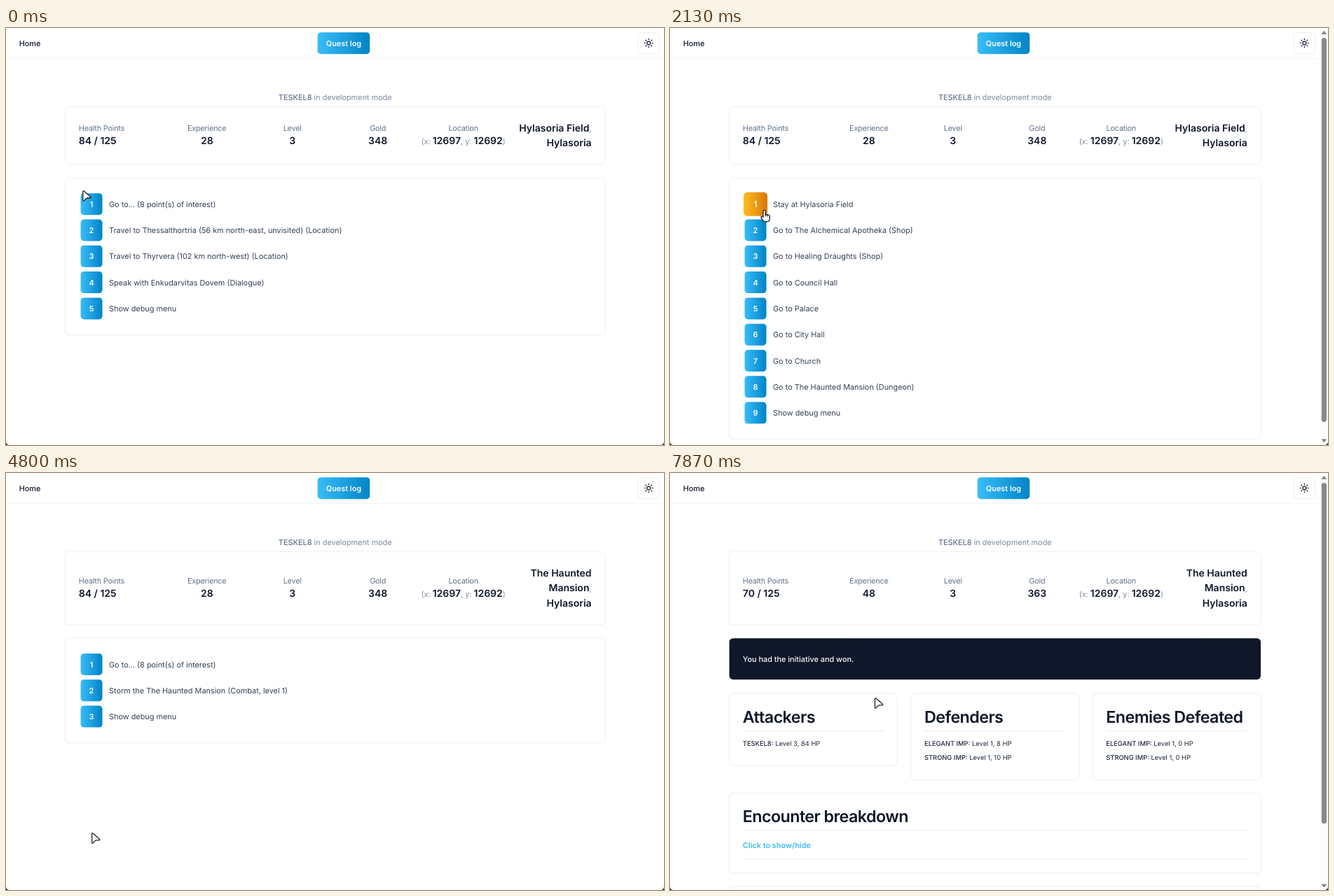
Write an HTML page that moves like this. It is 939 px wide and 596 px high and loops after 8 s.

```html
<!DOCTYPE html>
<html lang="en">
<head>
<meta charset="utf-8">
<title>Quest</title>
<style>
  html, body { margin: 0; height: 100%; overflow: hidden; background: #fff; }
  svg { display: block; width: 100vw; height: 100vh; }
  text { font: 400 10.88px Inter, sans-serif; fill: #0f172a; text-rendering: geometricPrecision; }
  .mid { text-anchor: middle; }
  .end { text-anchor: end; }
  .home { font-weight: 500; }
  .button { font-weight: 600; fill: #f8fafc; text-anchor: middle; }
  .choice { fill: #334155; }
  .muted { fill: #64748b; }
  .soft { fill: #7d8a9e; font-weight: 400; font-size: 10.88px; }
  .name { font-weight: 500; }
  .label { fill: #64748b; letter-spacing: -.02em; }
  .value { font-weight: 600; font-size: 14px; fill: #0f172a; }
  .heading { font-weight: 600; font-size: 23.3px; letter-spacing: -.025em; }
  .small { font-size: 9.33px; fill: #1e293b; }
  .notice { font-weight: 500; fill: #f8fafc; }
  .link { font-weight: 600; fill: #38bdf8; }
  .card { fill: #fff; stroke: #eaeff4; stroke-width: .8; filter: drop-shadow(0 .8px .8px #0000000d); }
  .rule { stroke: #e2e8f0; stroke-width: .9; }
  .icon { fill: none; stroke: #0f172a; stroke-width: 2; stroke-linecap: round; }
  .cursor { fill: #fff; stroke: #222; stroke-width: 1.3; stroke-linejoin: round; stroke-linecap: round; }
</style>
</head>
<body>
<svg viewBox="0 0 939 596">
  <defs>
    <linearGradient id="blue"><stop stop-color="#38bdf8"/><stop offset="1" stop-color="#0284c7"/></linearGradient>
    <linearGradient id="amber"><stop stop-color="#fbbf24"/><stop offset="1" stop-color="#d97706"/></linearGradient>
  </defs>
  <g id="scene"></g>
</svg>
<script>
const LOOP = 8000, TICK = 1000 / 15;
const LEFT = 84.6, INNER = 103.8, ROW = 37.3, BUTTON = 31;
const PLAYER = 'TESKEL8';

const field = ['Hylasoria Field', 'Hylasoria'];
const mansion = ['The Haunted', 'Mansion', 'Hylasoria'];
const before = ['84 / 125', 28, 3, 348];
const screens = [
  { from: 0, place: field, stats: before, choices: [
    'Go to... (8 point(s) of interest)',
    'Travel to Thessalthortria (56 km north-east, unvisited) (Location)',
    'Travel to Thyrvera (102 km north-west) (Location)',
    'Speak with Enkudarvitas Dovem (Dialogue)',
    'Show debug menu'] },
  { from: 1600, place: field, stats: before, thumbEnd: 563, choices: [
    'Stay at Hylasoria Field',
    'Go to The Alchemical Apotheka (Shop)',
    'Go to Healing Draughts (Shop)',
    'Go to Council Hall',
    'Go to Palace',
    'Go to City Hall',
    'Go to Church',
    'Go to The Haunted Mansion (Dungeon)',
    'Show debug menu'] },
  { from: 4800, place: mansion, stats: before, choices: [
    'Go to... (8 point(s) of interest)',
    'Storm the The Haunted Mansion (Combat, level 1)',
    'Show debug menu'] },
  { from: 6800, place: mansion, stats: ['70 / 125', 48, 3, 363], thumbEnd: 501 }
];

// Pointer hotspot: time, x, y
const pointer = [
  [0, 109.8, 232.6], [180, 91, 250], [330, 97, 268], [470, 120, 266], [600, 138, 257],
  [733, 137.5, 383], [800, 137.5, 383], [930, 136, 330], [1133, 135, 260.5],
  [2067, 135, 260.5], [2133, 134.6, 260], [2370, 137, 383], [2600, 134, 300],
  [3000, 134, 300], [3067, 133, 296], [3330, 131, 380], [3600, 125, 485], [3800, 122.6, 514.5],
  [5267, 122.6, 514.5], [5470, 205, 465], [5630, 242, 405], [5870, 165, 335], [6067, 118.2, 307.5],
  [7133, 118.2, 307.5], [7330, 160, 338], [7530, 220, 353], [7730, 278, 334], [7867, 292.5, 321.5]
];

function pointerAt(t) {
  const i = pointer.findIndex(p => p[0] > t);
  if (i < 0) return pointer.at(-1).slice(1);
  const [a, b] = [pointer[i - 1], pointer[i]];
  const k = (t - a[0]) / (b[0] - a[0]);
  return [a[1] + (b[1] - a[1]) * k, a[2] + (b[2] - a[2]) * k];
}

const text = (x, y, str, cls) => `<text x="${x}" y="${y}" class="${cls}">${str}</text>`;
const span = (str, cls) => `<tspan class="${cls}">${str}</tspan>`;
const box = (x, y, w, h, r, attrs) =>
  `<rect x="${x}" y="${y}" width="${w}" height="${h}" rx="${r}" ${attrs}/>`;
const card = (x, y, w, h) => box(x, y, w, h, 5.5, 'class="card"');
const rule = (x, y, w) => `<path class="rule" d="M${x} ${y}h${w}"/>`;

function header(shift) {
  const mid = 481.9 - shift / 2, sun = 917.2 - shift;
  let rays = '';
  for (let a = 0; a < 360; a += 45) rays += `<path d="M0-10v2" transform="rotate(${a})"/>`;
  return `<path d="M0 43.5h${939 - shift}" stroke="#f1f5f9"/>` +
    text(18.7, 25.6, 'Home', 'home') +
    box(mid - 37.3, 6.2, 74.6, BUTTON, 4.7, 'fill="url(#blue)"') +
    text(mid, 25.6, 'Quest log', 'button') +
    box(sun - 15.2, 6.5, 30.4, 30.4, 4.7, 'fill="#fff" stroke="#e2e8f0" stroke-width=".8"') +
    `<g class="icon" transform="translate(${sun} 21.5) scale(.622)"><circle r="4"/>${rays}</g>`;
}

function summary({ place, stats }, width) {
  const extra = (place.length - 2) * 10.9;
  const column = (width - 38.4) / 6, right = LEFT + width - 19.2;
  const labelY = 147 + extra, valueY = 166 + extra;
  let out = text(LEFT + width / 2, 102.8,
    span(PLAYER, 'muted name') + span(' in development mode', 'soft'), 'mid');
  out += card(LEFT, 112.8, width, 82 + 2 * extra);
  ['Health Points', 'Experience', 'Level', 'Gold', 'Location'].forEach((label, i) => {
    const x = i ? INNER + column * (i + .5) : INNER, align = i ? 'mid' : '';
    const value = i < 4 ? stats[i] :
      span('(x: ', 'soft') + 12697 + span(', y: ', 'soft') + 12692 + span(')', 'soft');
    out += text(x, labelY, label, 'label ' + align) + text(x, valueY, value, 'value ' + align);
  });
  place.forEach((line, i) => {
    const comma = i == place.length - 2 ? span(',', 'soft') : '';
    out += text(right, 147.6 + i * 21.75, line + comma, 'value end');
  });
  return out;
}

function choiceList(choices, top, width, [px, py]) {
  let hovering = false;
  let out = card(LEFT, top, width, 44 + BUTTON + ROW * (choices.length - 1));
  choices.forEach((label, i) => {
    const x = 122, y = top + 37.5 + i * ROW;
    const hover = Math.abs(px - x) < BUTTON / 2 && Math.abs(py - y) < BUTTON / 2;
    hovering ||= hover;
    out += `<g transform="translate(${x} ${y}) scale(${hover ? 1.1 : 1})">` +
      box(-15.5, -15.5, BUTTON, BUTTON, 4.7, `fill="url(#${hover ? 'amber' : 'blue'})"`) +
      text(0, 4, i + 1, 'button') + '</g>' + text(147, y + 4, label, 'choice');
  });
  return [out, hovering];
}

function combat(width) {
  const gap = 19.4, w = (width - 2 * gap) / 3;
  const groups = [
    ['Attackers', [PLAYER, 'Level 3, 84 HP']],
    ['Defenders', ['ELEGANT IMP', 'Level 1, 8 HP'], ['STRONG IMP', 'Level 1, 10 HP']],
    ['Enemies Defeated', ['ELEGANT IMP', 'Level 1, 0 HP'], ['STRONG IMP', 'Level 1, 0 HP']]
  ];
  let out = box(LEFT, 236.2, width, 59, 5.5, 'fill="#0f172a"') +
    text(INNER, 269.7, 'You had the initiative and won.', 'notice');
  groups.forEach(([title, ...members], i) => {
    const x = LEFT + i * (w + gap), tx = x + 19.2;
    out += card(x, 315.3, w, 82.3 + 20.3 * members.length) +
      text(tx, 356.7, title, 'heading') + rule(tx, 368.8, w - 38.4);
    members.forEach(([name, info], j) => {
      out += text(tx, 390 + j * 20.3, span(name + ':', 'small name') + ' ' + info, 'small');
    });
  });
  return out + card(LEFT, 457.7, width, 114.2) +
    text(INNER, 499.2, 'Encounter breakdown', 'heading') + rule(INNER, 511, width - 38.4) +
    text(INNER, 535.6, 'Click to show/hide', 'link') + rule(INNER, 552, width - 38.4) +
    card(LEFT, 591.3, width, 40);
}

const scrollbar = end => box(927.5, 0, 11.5, 596, 0, 'fill="#fcfcfc"') +
  box(929.8, 14, 7.2, end - 14, 3.6, 'fill="#8a8a8a"') +
  `<path d="M930.3 8.5h6.2l-3.1-4zM930.3 588h6.2l-3.1 4z" fill="#858585"
    stroke="#858585" stroke-linejoin="round"/>`;

const corners = '<path d="M0 591.5Q.5 595.5 4.5 596H0zM939 591.5Q938.5 595.5 934.5 596h4.5z" fill="#2a2a2a"/>';
const arrow = 'M0 1V13.6Q.3 15.2 1.6 14.2L4.9 10.9Q5.4 10.4 6.2 10.4H10.4Q12 10 10.8 8.8L1.5.5Q.2-.3 0 1Z';
const hand = 'M-1.6 10V1.6a1.6 1.6 0 0 1 3.2 0V6.2Q7.8 6.5 7.8 9V11.5Q7.8 16.7 3.2 16.7H1.5' +
  'Q-1 16.7-2.6 13.8L-4.7 10.7Q-4.4 8.2-1.6 10ZM1.6 6.2V8.6M4.2 6.8V8.8';

const scene = document.getElementById('scene');

function draw(t) {
  const screen = screens.findLast(s => s.from <= t + 5);
  const shift = screen.thumbEnd ? 11.8 : 0, width = 770.2 - shift;
  const at = pointerAt(t);
  const [body, hovering] = screen.choices
    ? choiceList(screen.choices, 214.2 + (screen.place.length - 2) * 21.8, width, at)
    : [combat(width), false];
  scene.innerHTML = header(shift) + summary(screen, width) + body +
    (screen.thumbEnd ? scrollbar(screen.thumbEnd) : '') + corners +
    `<path class="cursor" d="${hovering ? hand : arrow}" transform="translate(${at})"/>`;
}

let lastTick = -1;
function frame(now) {
  const tick = Math.floor((now % LOOP + 5) / TICK) % (LOOP / TICK);
  if (tick !== lastTick) draw((lastTick = tick) * TICK);
  requestAnimationFrame(frame);
}
frame(performance.now());
</script>
</body>
</html>
```
